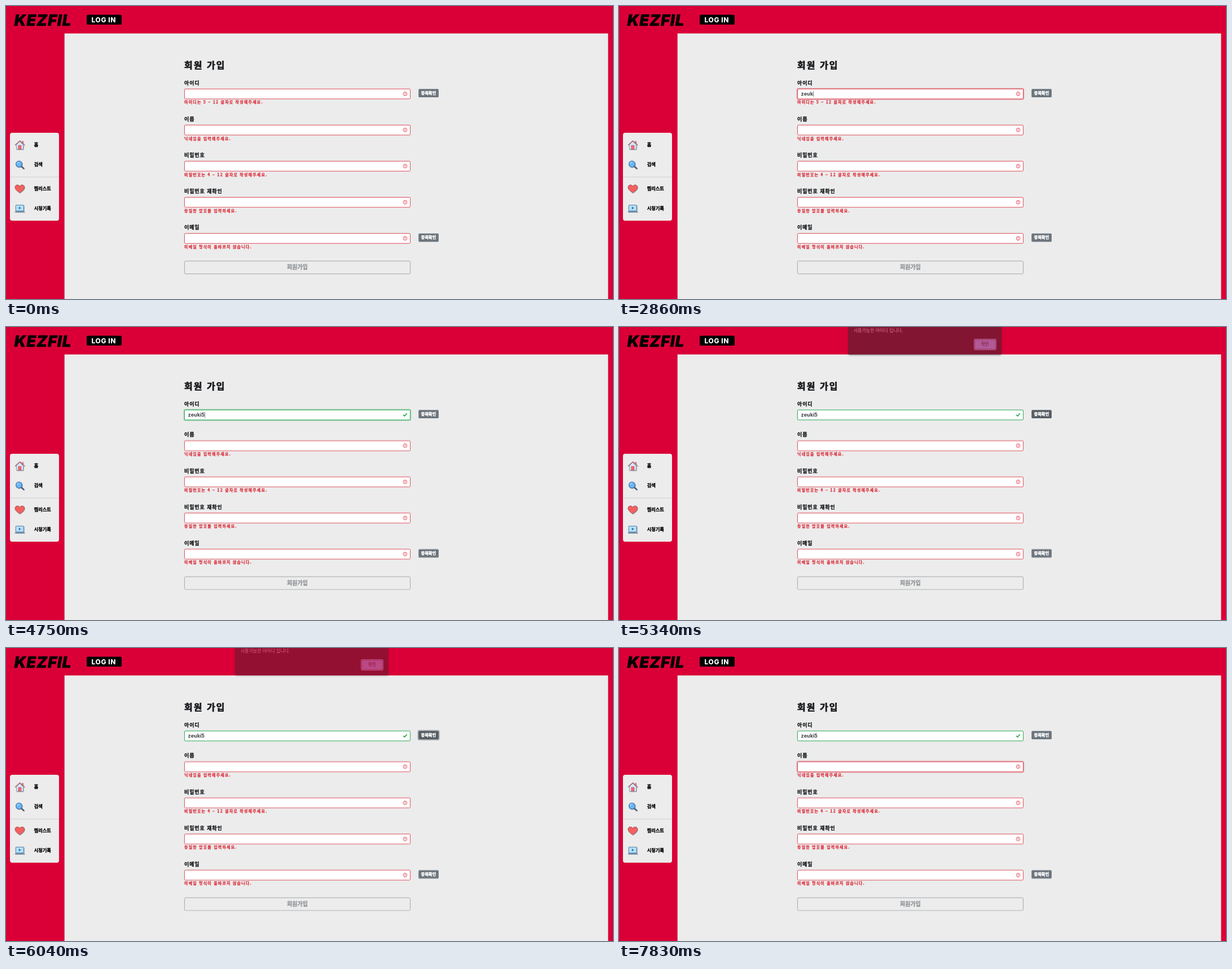
An HTML page for the animation above (8 s loop, 1076x520 px).

```html
<!DOCTYPE html>
<html lang="ko">
<head>
<meta charset="utf-8">
<title>회원 가입</title>
<style>
  html, body { margin: 0; width: 100%; height: 100%; overflow: hidden; background: #da0037; }
  svg { position: absolute; left: 0; top: 0; display: block; }
  /* A hairline in the text colour gives the heavy display weight. */
  text {
    font-family: "Noto Sans CJK KR", "Noto Sans CJK", sans-serif; font-weight: 900; white-space: pre;
    fill: var(--ink, #000); stroke: var(--ink, #000); stroke-width: var(--heavy, .3px);
  }
  .brand { font: italic 900 27.5px Inter, sans-serif; letter-spacing: .8px; }
  .login { font: 800 12px Inter, sans-serif; letter-spacing: .6px; --ink: #fff; --heavy: 0; }
  .title { font-size: 16px; letter-spacing: 2px; --ink: #1a1c1f; --heavy: .7px; }
  .label text { font-size: 9px; letter-spacing: .9px; --ink: #16191c; }
  .error text, text.error { font-size: 7px; letter-spacing: 1.2px; --ink: #dc2f3d; --heavy: .25px; }
  .menu { font-size: 8.2px; }
  .check { font-size: 7.2px; --ink: #fff; --heavy: .45px; }
  .submit { font-size: 10px; --ink: #92969a; text-anchor: middle; }
  .box { fill: #fff; stroke: #dc4a58; }
  .glow { fill: none; stroke: #dc3545; stroke-width: 3.6px; opacity: 0; }
  .mark { fill: none; stroke: #dc3545; }

  /* All timings are t / 80 ms on one 8 s clock. */
  .anim { animation: 8s step-end infinite; }

  #idBox { animation-name: idBox; }
  @keyframes idBox {
    0% { stroke: #dc4a58 }
    16.125% { stroke: #d83a4a }
    37% { stroke: #9a7447 }
    38.25%, to { stroke: #28a755 }
  }
  #idGlow { animation-name: idGlow; }
  @keyframes idGlow {
    0% { opacity: 0; stroke: #dc3545 }
    16.125% { opacity: .35; stroke: #dc3545 }
    37% { opacity: .35; stroke: #b07a4c }
    38.25% { opacity: .35; stroke: #28a755 }
    65.5%, to { opacity: 0; stroke: #28a755 }
  }
  .untilValid { animation-name: untilValid; }
  @keyframes untilValid { 0% { visibility: visible } 37%, to { visibility: hidden } }
  .whenValid { animation-name: whenValid; }
  @keyframes whenValid { 0% { visibility: hidden } 37%, to { visibility: visible } }
  #rest { animation-name: rest; }
  @keyframes rest { 0% { transform: none } 37%, to { transform: translateY(-9.4px) } }

  #nameBox { animation-name: nameBox; }
  @keyframes nameBox { 0% { stroke: #dc4a58 } 91.75%, to { stroke: #d83a4a } }
  #nameGlow { animation-name: nameGlow; }
  @keyframes nameGlow { 0% { opacity: 0 } 91.75% { opacity: .2 } 93%, to { opacity: .35 } }
  #nameCaret { animation-name: nameCaret; }
  @keyframes nameCaret {
    0% { visibility: hidden }
    91.75% { visibility: visible }
    97.875%, to { visibility: hidden }
  }

  #idButton { fill: #6c757d; animation-name: idButton; }
  @keyframes idButton { 0% { fill: #6c757d } 65.5% { fill: #565e64 } 84.25%, to { fill: #6c757d } }
  #idButtonGlow { opacity: 0; animation-name: buttonGlow; }
  @keyframes buttonGlow { 0% { opacity: 0 } 75.5% { opacity: .5 } 84.25%, to { opacity: 0 } }

  #dialog { opacity: 0; animation-name: dialog; }
  #dialog text { font-size: 8px; font-weight: 400; --ink: #e8eaed; --heavy: 0; }
  #dialog .ok { font-size: 7.5px; --ink: #202124; text-anchor: middle; }
  @keyframes dialog {
    0% { opacity: 0; transform: translateY(-9px) }
    66.75% { opacity: .5; transform: translateY(-4px) }
    68% { opacity: 1; transform: none }
    74.25% { opacity: .8; transform: translateY(-2px) }
    75.5% { opacity: .4; transform: translateY(-5px) }
    76.75% { opacity: .08; transform: translateY(-9px) }
    84.25%, to { opacity: 0; transform: translateY(-9px) }
  }

  #typed {
    position: absolute; left: 322.5px; top: 147px; height: 18px;
    display: flex; align-items: center;
    font: 700 9px/18px Inter, sans-serif; color: #3c4044;
  }
  #typed b { font-weight: inherit; }
  #typed b:nth-child(1) { animation-name: key1; }
  #typed b:nth-child(2) { animation-name: key2; }
  #typed b:nth-child(3) { animation-name: key3; }
  #typed b:nth-child(4) { animation-name: key4; }
  #typed b:nth-child(5) { animation-name: key5; }
  #typed b:nth-child(6) { animation-name: key6; }
  @keyframes key1 { 0% { font-size: 0 } 25.875%, to { font-size: 9px } }
  @keyframes key2 { 0% { font-size: 0 } 29.625%, to { font-size: 9px } }
  @keyframes key3 { 0% { font-size: 0 } 34.625%, to { font-size: 9px } }
  @keyframes key4 { 0% { font-size: 0 } 35.75%, to { font-size: 9px } }
  @keyframes key5 { 0% { font-size: 0 } 37%, to { font-size: 9px } }
  @keyframes key6 { 0% { font-size: 0 } 45.625%, to { font-size: 9px } }
  #typed i { width: 1px; height: 10px; margin-right: -1px; background: #777; animation-name: caret; }
  @keyframes caret {
    0% { visibility: hidden }
    16.125% { visibility: visible }
    22.25% { visibility: hidden }
    25.875% { visibility: visible }
    43.125% { visibility: hidden }
    45.625% { visibility: visible }
    51.875% { visibility: hidden }
    58.125% { visibility: visible }
    65.5%, to { visibility: hidden }
  }
</style>
</head>
<body>
<svg width="1076" height="520" viewBox="0 0 1076 520">
  <defs>
    <rect id="field" x="316.4" y=".2" width="400.2" height="17.7" rx="1.8"/>
    <g id="alert">
      <circle cx="707.5" cy="8.8" r="3.3" stroke-width=".9"/>
      <path d="M707.5 6.8v2.4M707.5 10v.9" stroke-width="1"/>
    </g>
    <rect id="button" x="731.3" y=".3" width="35.6" height="14.8" rx="1.6"/>
    <filter id="shade" x="-10%" y="-30%" width="120%" height="170%">
      <feDropShadow dx="0" dy="1" stdDeviation="1.5" flood-opacity=".5"/>
    </filter>
    <filter id="soft" x="-20%" y="-20%" width="150%" height="150%">
      <feDropShadow dx=".8" dy=".8" stdDeviation=".6" flood-opacity=".35"/>
    </filter>
  </defs>

  <rect width="1076" height="520" fill="#da0037"/>
  <rect x="103.7" y="48.7" width="963.6" height="472" fill="#ececec"/>
  <text class="brand" x="14.5" y="35">KEZFIL</text>
  <rect x="143" y="15.4" width="62" height="17.7" rx="2.2"/>
  <text class="login" x="151.5" y="28.5">LOG IN</text>

  <!-- side menu -->
  <rect x="7" y="225" width="87" height="156" rx="4" fill="#ececec"/>
  <path d="M7 303.5H94" stroke="#d2d2d2"/>
  <g filter="url(#soft)" stroke-linejoin="round" stroke-linecap="round">
    <path d="M18.5 246.5V254.3H30.5V246.5L24.5 240.5Z" fill="#d8e9fb" stroke="#6b8bb2" stroke-width=".8"/>
    <path d="M28.5 239.5h2v4.5l-2-2Z" fill="#d9636a"/>
    <path d="M16.5 246.5L24.5 239.3L32.5 246.5" fill="none" stroke="#b0636c" stroke-width="1.3"/>
    <rect x="22" y="247.3" width="5" height="6.8" fill="#f2696d" stroke="#b0454f" stroke-width=".5"/>
  </g>
  <g filter="url(#soft)" stroke-linecap="round">
    <path d="M27.5 284.8L31.3 288.3" stroke="#3d5a80" stroke-width="2.4"/>
    <circle cx="23" cy="280.5" r="5.4" fill="#69b7f5" stroke="#3f73ad" stroke-width="1.2"/>
    <path d="M20 280a3 3 0 0 1 3-3" fill="none" stroke="#c8e6ff"/>
  </g>
  <path filter="url(#soft)" fill="#f4605f" stroke="#8d4a50" stroke-width=".8"
    d="M24.3 331.5C20 328.5 16 325.5 16 321.8C16 317 22 316 24.3 320C26.6 316 32.6 317 32.6 321.8C32.6 325.5 28.6 328.5 24.3 331.5Z"/>
  <g filter="url(#soft)">
    <rect x="17.3" y="353.3" width="14" height="10.5" rx=".8" fill="#b4e2fa" stroke="#44719d" stroke-width=".9"/>
    <path d="M22.8 356L26.6 358.5L22.8 361Z" fill="#2f6da8"/>
    <path d="M15.8 365.2H32.8" stroke="#5b82aa" stroke-width="1.5"/>
  </g>
  <g class="menu">
    <text x="49.7" y="249">홈</text>
    <text x="49.7" y="283.6">검색</text>
    <text x="49.7" y="326.6">찜리스트</text>
    <text x="49.7" y="361.6">시청기록</text>
  </g>

  <!-- id field -->
  <text class="title" x="316" y="110.9">회원 가입</text>
  <g class="label"><text x="316" y="139.7">아이디</text></g>
  <use id="idGlow" class="glow anim" href="#field" y="147"/>
  <use id="idBox" class="box anim" href="#field" y="147"/>
  <use class="mark anim untilValid" href="#alert" y="147"/>
  <path class="anim whenValid" d="M704.3 155.8L706.5 158.1L710.7 153.2" fill="none" stroke="#28a745" stroke-width="1.7"/>
  <text class="error anim untilValid" x="316" y="173.4">아이디는 5 ~ 12 글자로 작성해주세요.</text>
  <use id="idButtonGlow" class="anim" href="#button" y="147" fill="none" stroke="#6c757d" stroke-width="3.6"/>
  <use id="idButton" class="anim" href="#button" y="147"/>
  <text class="check" x="735.8" y="156.6">중복확인</text>

  <!-- everything below moves up once the first hint goes -->
  <g id="rest" class="anim">
    <g class="label">
      <text x="316" y="203.7">이름</text>
      <text x="316" y="268.2">비밀번호</text>
      <text x="316" y="332.2">비밀번호 재확인</text>
      <text x="316" y="396.2">이메일</text>
    </g>
    <use id="nameGlow" class="glow anim" href="#field" y="211.1"/>
    <use id="nameBox" class="box anim" href="#field" y="211.1"/>
    <use class="box" href="#field" y="275.2"/>
    <use class="box" href="#field" y="339.3"/>
    <use class="box" href="#field" y="403.4"/>
    <rect id="nameCaret" class="anim" x="322" y="215.4" width="1" height="10" fill="#777"/>
    <g class="mark">
      <use href="#alert" y="211.1"/>
      <use href="#alert" y="275.4"/>
      <use href="#alert" y="339.5"/>
      <use href="#alert" y="403.6"/>
    </g>
    <g class="error">
      <text x="316" y="237.5">닉네임을 입력해주세요.</text>
      <text x="316" y="301.7">비밀번호는 4 ~ 12 글자로 작성해주세요.</text>
      <text x="316" y="365.7">동일한 암호를 입력하세요.</text>
      <text x="316" y="429.8">이메일 형식이 올바르지 않습니다.</text>
    </g>
    <use href="#button" y="403.5" fill="#6c757d"/>
    <text class="check" x="735.8" y="413.2">중복확인</text>
    <rect x="316.4" y="452.6" width="400.2" height="22.8" rx="2.3" fill="none" stroke="#a3a6a9"/>
    <text class="submit" x="516.5" y="467">회원가입</text>
  </g>

  <g id="dialog" class="anim">
    <rect x="406" y="-30" width="272" height="83.5" rx="3.5" fill="#292a2d" filter="url(#shade)"/>
    <text x="415.7" y="13">사용가능한 아이디 입니다.</text>
    <rect x="629.7" y="25.7" width="38.6" height="18.6" rx="2.8" fill="#33415c" stroke="#a9c6f6" stroke-width="1.2"/>
    <rect x="631" y="27" width="36" height="16" rx="1.8" fill="#8ab4f8"/>
    <text class="ok" x="649" y="36.9">확인</text>
  </g>
</svg>
<div id="typed"><b class="anim">z</b><b class="anim">e</b><b class="anim">u</b><b class="anim">k</b><b class="anim">i</b><b class="anim">5</b><i class="anim"></i></div>
</body>
</html>
```
